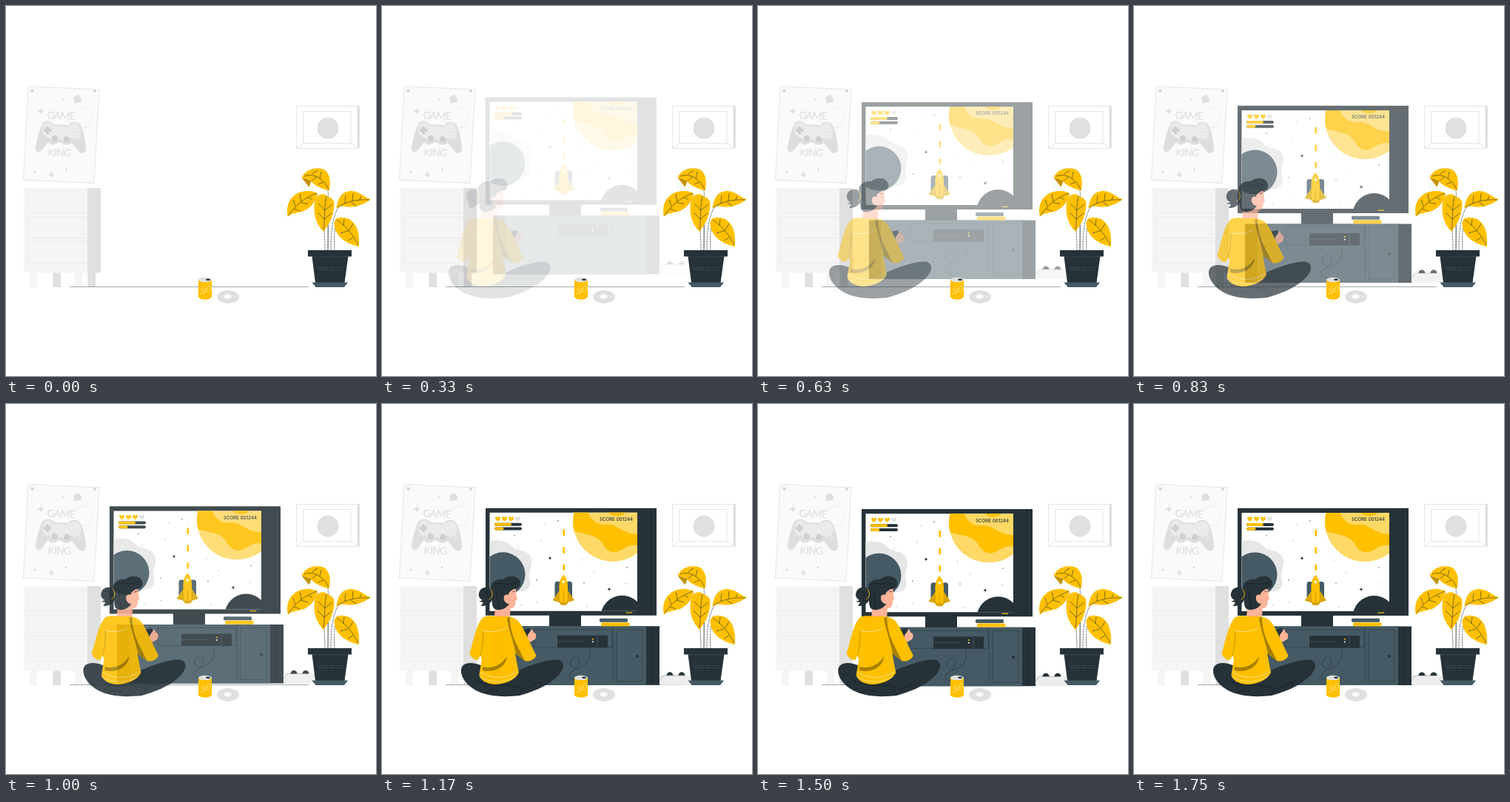
These frames come from a looping animation (500x500 px, 1.79 s). An HTML page:

```html
<!DOCTYPE html>
<html>
<head>
<meta charset="utf-8">
<style>
html, body { margin: 0; width: 100%; height: 100%; overflow: hidden; background: #fff; }
svg { display: block; width: 100vw; height: 100vh; }
.y { fill: #ffc000; } .d { fill: #263238; } .m { fill: #455a64; }
.g { fill: #e0e0e0; } .l { fill: #f5f5f5; } .skin { fill: #ffb499; } .shade { fill: #a87f00; }
.line { fill: none; stroke: #263238; stroke-width: .6; }
.stem { fill: none; stroke: #263238; stroke-width: .6; stroke-dasharray: 3 .6; }
.pale { fill: none; stroke: #e0e0e0; stroke-width: .8; }
.faint { fill: none; stroke: #fff; stroke-opacity: .75; stroke-width: .7; }
.fold { fill: none; stroke: #10181c; stroke-width: .6; }
</style>
</head>
<body>
<svg viewBox="0 0 500 500">
<defs>
  <clipPath id="screen"><path d="M145.500 147H345V280H145.500Z"/></clipPath>
  <clipPath id="planet"><circle cx="312" cy="159" r="54"/></clipPath>
  <path id="star" d="M0-5Q.8-.8 5 0Q.8.8 0 5Q-.8.8-5 0Q-.8-.8 0-5Z"/>
  <path id="heart" d="M0 3.200C-3 1-3.800-.3-3.500-1.700C-3-3.500-.7-3.500 0-1.700C.7-3.500 3-3.500 3.500-1.700C3.800-.3 3 1 0 3.200Z"/>
</defs>

<!-- poster -->
<path d="M30 108.500L126 113L119 239.500L23.500 235Z" fill="#fafafa" stroke="#e0e0e0" stroke-width=".8"/>
<g fill="#d2d2d2">
  <circle cx="35.500" cy="114.500" r="2"/><circle cx="120" cy="115" r="2"/>
  <circle cx="77.500" cy="126" r="1"/><circle cx="39" cy="224.500" r="1.200"/>
  <circle cx="81" cy="221" r="1.200"/><circle cx="107" cy="153" r=".8"/>
</g>
<path class="pale" stroke-opacity=".7" d="M92 142C100 134 115 138 116 151C116 161 108 167 101 164"/>
<path class="g" d="M91 124L97 119.500L102.500 125L101 130L92 131Z"/>
<use href="#star" class="g" x="47" y="142"/><use href="#star" class="g" x="61.500" y="228"/>
<g font-family="Lato, sans-serif" font-size="14" letter-spacing="-.8" fill="#dcdcdc">
  <text transform="translate(55 152.500) rotate(2) skewX(-4)">GAME</text>
  <text transform="translate(56 202.500) rotate(2) skewX(-4)">KING</text>
</g>
<path d="M50 158C54 154 62 155 65 160L84 161C87 156 96 155 100 160C105 169 108 183 108 193C107 201 100 200 96 194L89 185C82 190 78 187 75 185L70 184C66 189 60 189 57 184L49 194C44 200 39 197 40 190C42 179 45 167 50 158Z" fill="#dedede"/>
<path d="M52 159C56 156 62 157 64 162L84 163C88 158 95 157 99 161C103 170 102 179 94 180L87 178C80 183 76 181 74 179C68 183 62 182 58 178C50 179 47 168 52 159Z" fill="#ebebeb"/>
<g fill="#cfcfcf">
  <path d="M54 163H58V166H61V170H58V173H54V170H51V166H54Z"/>
  <circle cx="66" cy="179" r="4"/><circle cx="82" cy="180" r="4"/>
</g>
<g fill="#fafafa" stroke="#d5d5d5" stroke-width=".6">
  <circle cx="93" cy="163.500" r="2"/><circle cx="93" cy="172" r="2"/>
  <circle cx="88.700" cy="167.700" r="2"/><circle cx="97.300" cy="167.700" r="2"/>
</g>

<!-- drawers -->
<path class="l" d="M32 360H42V380H32ZM93 360H103V380H93Z"/>
<path class="g" d="M63.500 360H74V380H63.500ZM110.500 360H121V380H110.500Z"/>
<path class="l" d="M24 246H110V360.500H24Z"/>
<path class="g" d="M110 246H128V360.500H110Z"/>
<path fill="none" stroke="#ebebeb" d="M110 251H28.500V279.500H110M110 285H28.500V313.500H110M110 319H28.500V347.500H110M65 265.500H69M65 299.500H69M65 333.500H69"/>

<!-- framed picture -->
<path class="g" d="M475 135H478V192.500H475Z"/>
<path class="pale" d="M392.500 135.500H475V192.500H392.500ZM401.500 142.500H466V185.500H401.500ZM392.500 192.500L401.500 185.500M475 192.500L466 185.500"/>
<circle class="g" cx="435" cy="165" r="14.500"/>

<path d="M86 379.500H409" stroke="#7d868a" stroke-width=".7"/>

<!-- television and cabinet -->
<g id="tv">
  <path d="M376 367H417V380H376Z" fill="#ededed"/>
  <path class="d" d="M384.500 367A4.500 4.500 0 0 1 393.500 367ZM400.500 367A4.500 4.500 0 0 1 409.500 367Z"/>
  <path class="line" stroke-opacity=".5" d="M375 374L380 367H409"/>
  <path class="d" d="M140 140.800H371V286H140ZM226 286H269V300.500H226ZM150 300.500H375V380H150Z"/>
  <path class="m" d="M167 300.500H357V380H167Z"/>
  <path class="fold" stroke-opacity=".5" d="M345 141V286M363 141V286M366 301V380M312 301V375M317 305H352V375H317ZM205 305H311V329H205Z"/>
  <circle class="d" cx="345" cy="341" r="2"/>
  <path class="d" d="M237 313H305V329.500H237Z"/>
  <path d="M237 321H273M291 314V329" stroke="#56656c" stroke-width=".6"/>
  <circle class="y" cx="285" cy="317.800" r="1"/><circle cx="285" cy="321.500" r="1" fill="#fff"/>
  <path class="line" d="M280 332C284 343 278 352 268 357C258 361 252 352 256 346C260 340 268 342 267 350C265 359 253 362 253 368C255 374 261 370 264 376"/>
  <rect class="m" x="294" y="289.800" width="38" height="5" rx="1.500"/>
  <rect class="y" x="296" y="295.300" width="38.500" height="5" rx="1.500"/>
  <path d="M145.500 147H345V280H145.500Z" fill="#fff"/>
  <g clip-path="url(#screen)">
    <circle cx="312" cy="159" r="54" fill="#ffd966"/>
    <g clip-path="url(#planet)" class="y">
      <path d="M250 140H277C280 158 291 164 303 163C319 161 326 179 350 175V193C341 189 333 191 326 196C312 205 304 199 298 189C289 174 275 179 250 168Z"/>
      <path d="M305 145C309 153 326 154 330 145Z"/>
    </g>
    <path d="M140 187C155 181 171 186 175 192C181 200 194 195 201 207C205 218 197 224 200 237C204 250 191 256 181 252C170 250 160 262 140 258Z" fill="#e6e6e6"/>
    <circle class="m" cx="163.500" cy="230.500" r="30"/>
    <circle class="d" cx="324.500" cy="288" r="29"/>
    <g id="dots" fill="#5d6b72"></g>
    <use href="#star" class="d" transform="translate(227 208.500) scale(.5)"/>
    <use href="#star" class="d" transform="translate(307 250.500) scale(.5)"/>
    <path d="M245.700 171V224" stroke="#ffc000" stroke-width="2.800" stroke-linecap="round" stroke-dasharray="6.500 17"/>
    <rect class="m" x="233.500" y="240" width="8" height="23" rx="3.500"/>
    <rect class="m" x="249" y="240" width="8" height="23" rx="3.500"/>
    <path d="M240 252L230.500 265.500L239 268L242 272H249L252 268L260 265.500L251 252Z" fill="#d9a400"/>
    <path class="y" d="M245.300 231C250 235 251.500 243 251 251L250 268H240.500L239.500 251C239 243 240.500 235 245.300 231Z"/>
    <circle cx="245.300" cy="240.500" r="2" fill="#fff3c4"/>
    <path class="fold" stroke-opacity=".4" d="M245.300 254V268"/>
  </g>
  <text x="294" y="158.300" font-family="Inter, sans-serif" font-size="6.200" font-weight="500" class="d">SCORE 001244</text>
  <use href="#heart" class="y" x="156.600" y="155.500"/><use href="#heart" class="y" x="165.500" y="155.500"/>
  <use href="#heart" class="y" x="174.400" y="155.500"/><use href="#heart" class="g" x="183.500" y="155.500"/>
  <g stroke-width="4" stroke-linecap="round">
    <path d="M154 163H187M154 168.700H187" stroke="#263238"/>
    <path d="M154 163H173M154 168.700H162.500" stroke="#ffc000"/>
  </g>
  <path class="y" d="M329.500 281.500H338V282.700H329.500Z"/>
</g>

<!-- player -->
<g id="player">
  <path class="d" d="M107 362C106 349 120 347 136 354L180 362C203 352 222 345 237 345.500C249 347 247 361 234 371C222 382 201 390 186 394C160 397 140 394 127 387C115 380 108 371 107 362Z"/>
  <path class="fold" d="M125 372C145 385 165 376 192 385M184 394C190 386 200 380 216 376M140 390C146 386 150 386 158 389"/>
  <path class="skin" d="M154 268L174 270L173 288C167 293 158 293 152 288Z"/>
  <path class="skin" d="M158 250C164 244 178 244 181 250L182 260L183 264L180.500 266C181 274 178 277 170 276C161 275 155 266 158 250Z"/>
  <path class="d" d="M190 305L200 303L202 313L192 318Z"/>
  <path class="skin" d="M197 312L203 304L205 309C209 309 209 315 207 318L200 322L196 319Z"/>
  <path class="y" d="M137 288C146 284 156 288 161 287C170 286 180 288 185 294C192 303 198 319 208.500 340C206 346 198 349 193 347L180 337L185 363C180 374 164 379 152 379C142 378 133 374 131.500 366L135 345L133 340L130 346C124 346 119 341 118.500 337C124 320 127 298 137 288Z"/>
  <path class="shade" d="M169 289C171 305 178 321 181 338L193 347C184 327 173 313 173 288ZM136 355C148 358 161 354 169 341C168 354 154 364 136 360Z"/>
  <path class="faint" d="M133 362C149 373 170 371 184 361M131.500 368C147 378 167 377 181 368M136 306C145 309 160 308 168 302"/>
  <path class="fold" stroke-opacity=".4" d="M137 306C137 318 136 330 133 340"/>
  <path class="d" d="M148 249C145 242 156 235 164 237C169 232 181 231 185 237C190 243 186 251 178 250C174 253 171 254 171 258C167 256 164 260 165 264C166 269 170 270 172 270C168 277 157 281 151 276C147 269 150 262 148 256Z"/>
  <path class="d" d="M148 250C143 246 134 248 132 253C129 259 132 263 136 265L131 267L137 268L134 273C142 274 150 268 150 260Z"/>
  <path class="skin" d="M165 260C167 256 172 258 172 262C172 266 168 268 166 266Z"/>
  <path d="M146 250C151 254 150 261 145 264" fill="none" stroke="#ffc000" stroke-width=".9"/>
  <path class="fold" d="M176 254L180 253M152 244C160 240 170 246 183 241M156 252C155 262 156 270 159 276M135 254C139 251 144 254 142 260"/>
</g>

<!-- can and disc -->
<path class="y" d="M260 370H278V393C276 398 262 398 260 393Z"/>
<ellipse class="g" cx="269" cy="370" rx="9" ry="3.300"/>
<ellipse class="d" cx="273" cy="369.700" rx="3" ry="1.300"/>
<path class="faint" d="M262 389C269 390 272 384 268 381C264 379 263 386 268 386C274 386 270 378 275 378C278 380 276 386 272 388"/>
<path class="g" fill-rule="evenodd" d="M285 393A15 9 0 1 1 315 393A15 9 0 1 1 285 393M294.500 392.500A5 3 0 1 0 304.500 392.500A5 3 0 1 0 294.500 392.500"/>

<!-- plant -->
<path class="stem" d="M431 331C431 312 428 290 431 272M435 331C437 300 436 270 420 254M439 331C439 305 441 287 449 272M444 331C443 312 444 300 447 290M435 331C434 300 437 270 435 249"/>
<g class="y">
  <path d="M399.500 232C405 219 421 217 430 221C439 227 439 240 436.500 249.500C427 247 416 243 411 235Z"/>
  <path d="M381 285C377 267 386 255 399 251C408 249 416 250 421 253C420 264 411 274 400 278C391 280 385 280 381 285Z"/>
  <path d="M429 305C419 295 415 281 417 267C419 255 426 253 432 255C438 260 444 259 443.500 269C443 285 436 296 429 305Z"/>
  <path d="M446.500 274C448 260 453 251 465 250C477 249 484 259 493 261C482 270 468 273 459 271C453 270 450 271 446.500 274Z"/>
  <path d="M477 325C461 322 446 312 444 298C442 288 448 285 456 286C469 287 479 299 477 325Z"/>
</g>
<path d="M399.500 232L413 236L409.500 244.500Z" fill="#c39300"/>
<path class="line" d="M403 230C416 225 430 234 436 248M414 227L421 222M424 233L426 224M420 230L414 236M429 238L422 241
M382 283C390 270 403 259 420 253M391 271L388 262M399 264L397 254M398 265L408 268M389 274L397 277M408 259L414 261
M429 303C431 288 430 270 433 257M430 288L421 279M430 288L440 280M431 276L422 267M431 276L441 268
M448 272C460 264 474 261 491 262M458 267L459 256M468 264L469 253M466 265L473 270M478 262L480 257
M447 289C459 297 469 309 476 323M456 297L457 288M463 304L469 294M462 304L452 307M469 313L462 317"/>
<path class="d" d="M408 330H467V338.500H408ZM413.500 338H462.500L457.500 374H418Z"/>
<path class="m" d="M413.500 373.500H462L457 380H418.500Z"/>
<path d="M414 339H462M420 353.500H456M421 356.500H455" stroke="#4a5960" stroke-width=".6" stroke-dasharray="7 1"/>
</svg>
<script>
const LOOP = 1790, SLIDE = 1740, SHIFT = 20;
const get = id => document.getElementById(id);
const tv = get('tv'), player = get('player');

const dots = [[179, 178], [220, 163], [184, 194], [209, 238], [270, 211], [287, 228], [331, 221],
  [277, 274], [330, 243], [238, 158], [188, 272], [209, 268], [273, 242], [215, 185]];
get('dots').innerHTML = dots.map(([x, y], i) =>
  `<circle cx="${x}" cy="${y}" r="${i % 3 ? .5 : .8}"/>`).join('');

// cubic-bezier(.36, -.01, .5, 1.38)
const curve = (a, b, s) => 3 * a * s * (1 - s) ** 2 + 3 * b * s * s * (1 - s) + s ** 3;
function ease(x) {
  let lo = 0, hi = 1;
  for (let i = 0; i < 24; i++) {
    const mid = (lo + hi) / 2;
    if (curve(.36, .5, mid) < x) lo = mid; else hi = mid;
  }
  return curve(-.01, 1.38, lo);
}

function draw() {
  const p = ease(Math.min(1, performance.now() % LOOP / SLIDE));
  const offset = SHIFT * (p - 1);
  tv.setAttribute('transform', `translate(0 ${offset})`);
  player.setAttribute('transform', `translate(${offset} 0)`);
  for (const part of [tv, player]) part.setAttribute('opacity', Math.min(1, Math.max(0, p)));
  requestAnimationFrame(draw);
}
draw();
</script>
</body>
</html>
```
